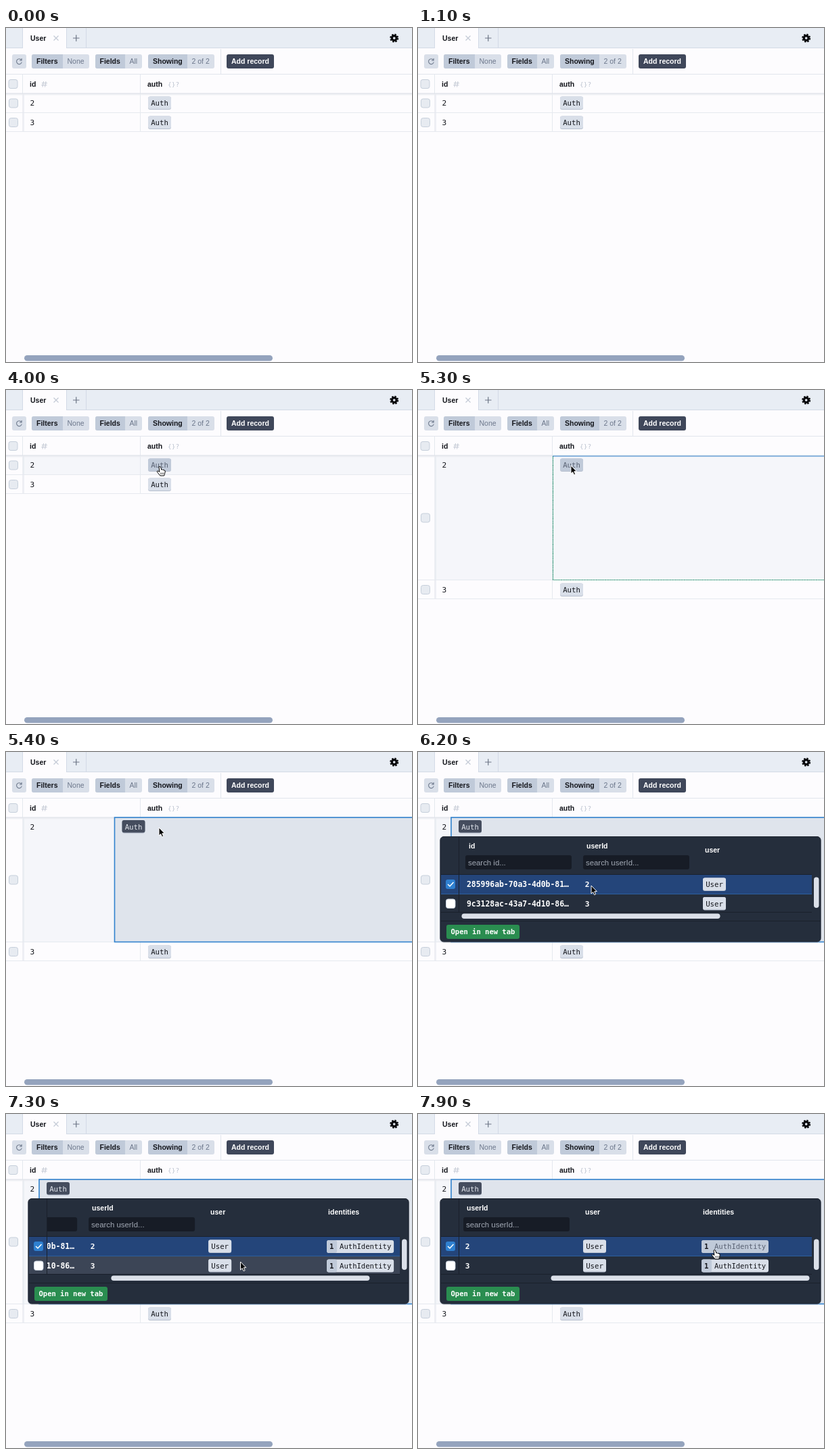
Animation of 600 by 495 pixels, one loop 8000 ms. Source, as an HTML page:

```html
<!DOCTYPE html>
<html lang="en">
<head>
<meta charset="utf-8">
<title>Table browser</title>
<style>
  html, body { margin: 0; width: 100%; height: 100%; overflow: hidden; background: #fdfcfe; }
  svg { display: block; width: 600px; height: 495px; }
  text { font: 10.5px "Liberation Sans", Arial, sans-serif; white-space: pre; }
  .bold { font-weight: 700; }
  .mono { font-family: "DejaVu Sans Mono", monospace; }
</style>
</head>
<body>
<svg id="stage" viewBox="0 0 600 495"></svg>
<script>
const stage = document.getElementById('stage');
const LOOP = 8000, STEP = 100;
const INK = '#14161c', PALE = '#d9dfe9', MID = '#c0cad9', NAVY = '#252e3c', BLUE = '#3182ce';

const clamp = v => Math.max(0, Math.min(1, v));
const ease = v => v * v * (3 - 2 * v);
const ramp = (t, from, to) => ease(clamp((t - from) / (to - from)));
const mix = (a, b, k) => a + (b - a) * k;

const rect = (x, y, w, h, fill, r = 0, more = '') =>
  `<rect x="${x}" y="${y}" width="${w}" height="${h}" rx="${r}" fill="${fill}" ${more}/>`;
const text = (x, y, s, fill = INK, cls = '', size = 10.5) =>
  `<text x="${x}" y="${y}" fill="${fill}" class="${cls}" style="font-size:${size}px">${s}</text>`;
const path = (d, stroke, width = 1, more = '') =>
  `<path d="${d}" fill="none" stroke="${stroke}" stroke-width="${width}" ${more}/>`;

// Two-tone toolbar button: bold label, then its value
const pill = (x, split, end, label, value, gap) =>
  rect(x, 39, end - x, 21, PALE, 3) +
  `<path d="M${split} 39H${x + 3}q-3 0-3 3v15q0 3 3 3H${split}z" fill="${MID}"/>` +
  text(x + gap, 53, label, INK, 'bold') + text(split + 6.5, 53, value, '#6c778b');

const checkbox = (x, y) =>
  rect(x - 6.5, y - 6.5, 13, 13, '#e7ebf1', 3, 'stroke="#c6cfdb"');

const tag = (x, y, label, fill = PALE, color = INK) =>
  rect(x, y - 9.5, 34, 19.5, '#b7c0cf', 3) + rect(x, y - 9.5, 34, 18.5, fill, 3) +
  text(x + 4.2, y + 4, label, color, 'mono', 10.7);

const cursorKeys = [
  [1900, 130, 500], [2200, 133, 326], [2300, 133, 326], [2400, 137, 317],
  [2700, 137, 317], [3600, 226, 114], [4000, 227, 113], [4900, 227, 113],
  [5000, 226, 112], [5800, 226, 112], [6200, 256, 198], [6700, 267, 217],
  [7000, 267, 217], [7600, 426, 221], [7900, 438, 201]
];

function cursorAt(t) {
  const i = cursorKeys.findIndex(k => k[0] > t);
  if (i === 0) return { x: -50, y: -50 };
  if (i < 0) return { x: 438, y: 201 };
  const [a, b] = [cursorKeys[i - 1], cursorKeys[i]];
  const k = ramp(t, a[0], b[0]);
  return { x: mix(a[1], b[1], k), y: mix(a[2], b[2], k) };
}

function cursor({ x, y }, hand) {
  const shape = hand
    ? '<path d="M-1 1.2Q0-.6 1.5 1L2.8 5.2 4 4.6 5.1 5.7 6.3 5.2 7 6.4Q8.5 6 8.3 8L7.4 11.5 6.7 14H1L-3 9.3Q-4.8 7-2.8 6.8L-.1 8.3z" fill="#fff" stroke="#000"/><path d="M1.7 9.5v2.5m2-2.5v2.5m2-2.5v2.5" stroke="#000" stroke-width=".7"/>'
    : '<path d="M0 0V12L2.7 9.5 4.6 13.7 6.6 12.8 4.8 8.7H8.4z" fill="#000" stroke="#fff" stroke-width="1"/>';
  return `<g transform="translate(${x} ${y})">${shape}</g>`;
}

function tabs() {
  return rect(0, 0, 600, 30, '#e8edf4') + rect(25, 0, 65, 30, '#fdfcfe') +
    path('M0 29.5H25M90 29.5H600M24.5 0V30M89.5 0V30M118.5 0V30', '#d3dae6') +
    text(36, 18.5, 'User', INK, 'bold') +
    path('M70.5 11.5l7 7m0-7l-7 7', '#c3cad6', 1.2) +
    path('M99 15h9.5m-4.75-4.75v9.5', '#6c7585', 1.2) +
    '<g fill="none" stroke="#08090c"><circle cx="573.7" cy="15" r="3.4" stroke-width="3.2"/>' +
    '<circle cx="573.7" cy="15" r="5.2" stroke-width="2.6" stroke-dasharray="2.3 1.784"/></g>';
}

function toolbar() {
  return rect(9, 39, 21, 21, PALE, 3) +
    path('M22.6 47.3A3.9 3.9 0 1 0 23.3 50.5M23.1 45v3h-3', '#6f7a8d', 1.1) +
    pill(38, 84, 123, 'Filters', 'None', 7) +
    pill(132, 176, 201, 'Fields', 'All', 6.5) +
    pill(210, 268, 308, 'Showing', '2 of 2', 7) +
    rect(326, 39, 70, 21, '#3f475a', 3) + text(333, 53, 'Add record', '#fff', 'bold') +
    path('M317.5 31V68M0 68.5H600', '#e2e6ed');
}

function columnHeads() {
  return checkbox(10.5, 83) + text(35, 87, 'id', INK, 'bold') +
    path('M55.5 79l-1.5 8.5m5-8.5l-1.5 8.5M52.8 81.7h8.2m-8.8 3h8.2', '#c3c9d4') +
    text(209, 87, 'auth', INK, 'bold') + text(239, 87, '{}?', '#bcc3cf', 'mono', 9.5) +
    path('M24.5 69V97M198.5 69V97', '#e4e8ee') +
    rect(0, 96.5, 600, 1.2, '#dadfe7') + rect(0, 97.7, 600, 2, '#e9ecf1', 0, 'opacity=".6"');
}

function rows(t, at, tall) {
  const split = 125.5 + tall, end = 153.5 + tall;
  const first = at.y >= 97 && at.y < split || t >= 5000;
  const second = !first && at.y >= split && at.y < end;
  const pressed = t >= 3500;
  return (first ? rect(25, 98, 575, split - 98, '#f5f6fa') : '') +
    (second ? rect(25, split, 575, 28, '#f5f6fa') : '') +
    rect(24, 98, 3, end - 98, '#e2e6ed', 0, 'opacity=".55"') +
    path(`M198.5 98V${end}M0 ${split}H600M0 ${end}H600`, '#e6e9ef') +
    checkbox(11, 111.5 + tall / 2) + checkbox(11, 140 + tall) +
    text(35.5, 115, '2', INK, 'mono', 11.2) + text(35.5, 144 + tall, '3', INK, 'mono', 11.2) +
    tag(210, 111, 'Auth', pressed ? MID : PALE, pressed ? '#596273' : INK) +
    tag(210, 140 + tall, 'Auth');
}

function openCell(t, tall) {
  if (t < 5100) return '';
  const k = ramp(t, 5300, 5600), x = mix(199.5, 49, k), bottom = 125.5 + tall;
  if (!k) {
    return path(`M199.5 98V${bottom}H600`, '#3a9d7c', 1.2, 'stroke-dasharray="2 .6"') +
      path('M199 98H600', BLUE, 1.2);
  }
  return rect(x, 97, 560, bottom - 97, '#dfe4ec', 0, `stroke="${BLUE}" stroke-width="1.6"`) +
    tag(x + 11, 110.5, 'Auth', '#454d5e', '#e3e7ee');
}

const search = (x, name) =>
  rect(x, 153, 157, 21, '#171c26', 3) + text(x + 4, 167.5, `search ${name}...`, '#a2a9b5', '', 11.4);

function identity(x, y, hover) {
  return rect(x, y - 9, 99, 19, hover ? MID : PALE, 3) + rect(x, y - 9, 15, 19, MID, 3) +
    text(x + 4, y + 4, '1', INK, 'mono bold', 10.7) +
    text(x + 19, y + 4, 'AuthIdentity', hover ? '#596273' : INK, 'mono', 10.55);
}

function panel(t, at) {
  const shown = ramp(t, 5400, 5800);
  if (!shown) return '';
  const slide = ramp(t, 6860, 7560), s = 177 * slide;
  const lower = at.y >= 210 && at.y < 237;
  const line = (y, id, n, hover) =>
    text(72 - s, y + 4, id, '#fff', 'mono bold', 11.4) +
    text(246.7 - s, y + 4, n, '#fff', 'mono bold', 11.2) +
    tag(421 - s, y, 'User') + identity(596 - s, y, hover);
  return `<g opacity="${shown}">` +
    rect(32, 125.5, 564, 157, '#8d96a5', 6, 'opacity=".6"') +
    rect(33, 125.5, 562, 155.5, NAVY, 5, 'stroke="#1b212c"') +
    rect(34, 182, 548, 28, '#24457a') +
    (lower ? rect(34, 211, 548, 26, '#3c4556') : '') +
    path('M34 181.5H582M34 237.5H582M34 250.5H595', '#1a202b') +
    path('M34 210.5H582', '#2d5f9f') + path('M60.5 126V237', '#1a202b') +
    '<clipPath id="cells"><path d="M61 126h521v111H61z"/></clipPath><g clip-path="url(#cells)">' +
    text(75 - s, 143, 'id', '#fff', 'bold') + search(70 - s, 'id') +
    text(249 - s, 143, 'userId', '#fff', 'bold') + search(244 - s, 'userId') +
    text(424 - s, 149, 'user', '#fff', 'bold') + text(598 - s, 149, 'identities', '#fff', 'bold') +
    line(196, '285996ab-70a3-4d0b-81…', 2, t >= 7800) +
    line(224.5, '9c3128ac-43a7-4d10-86…', 3, false) + '</g>' +
    rect(41, 189, 14, 14, '#2f80d0', 3) + path('M44 196l3 3 5.5-6', '#fff', 1.5) +
    rect(41.5, 218, 13.5, 13.5, '#fff', 3, 'stroke="#c6cfdb"') +
    rect(64.5 + 132 * slide, 239.5, 382, 7.5, '#dbe0e9', 3.75) +
    rect(585, 185.5, 7.5, 45.5, '#dbe0e9', 3.75) +
    rect(42, 256, 108, 21, '#2a8d50', 3) +
    text(48.5, 270, 'Open in new tab', '#fff', 'mono bold', 10.5) + '</g>';
}

function draw(t) {
  const at = cursorAt(t), tall = 156 * ramp(t, 4900, 5200);
  const hand = t >= 3500 && t < 5000 || t >= 7800;
  stage.innerHTML = rect(0, 0, 600, 495, '#fdfcfe') + tabs() + toolbar() +
    rows(t, at, tall) + columnHeads() + openCell(t, tall) + panel(t, at) +
    rect(27, 485, 367, 8.5, '#94a3bd', 4.25) + cursor(at, hand);
}

let last = -1;
function tick() {
  const t = Math.floor(performance.now() % LOOP / STEP) * STEP;
  if (t !== last) draw(last = t);
  requestAnimationFrame(tick);
}
tick();
</script>
</body>
</html>
```
